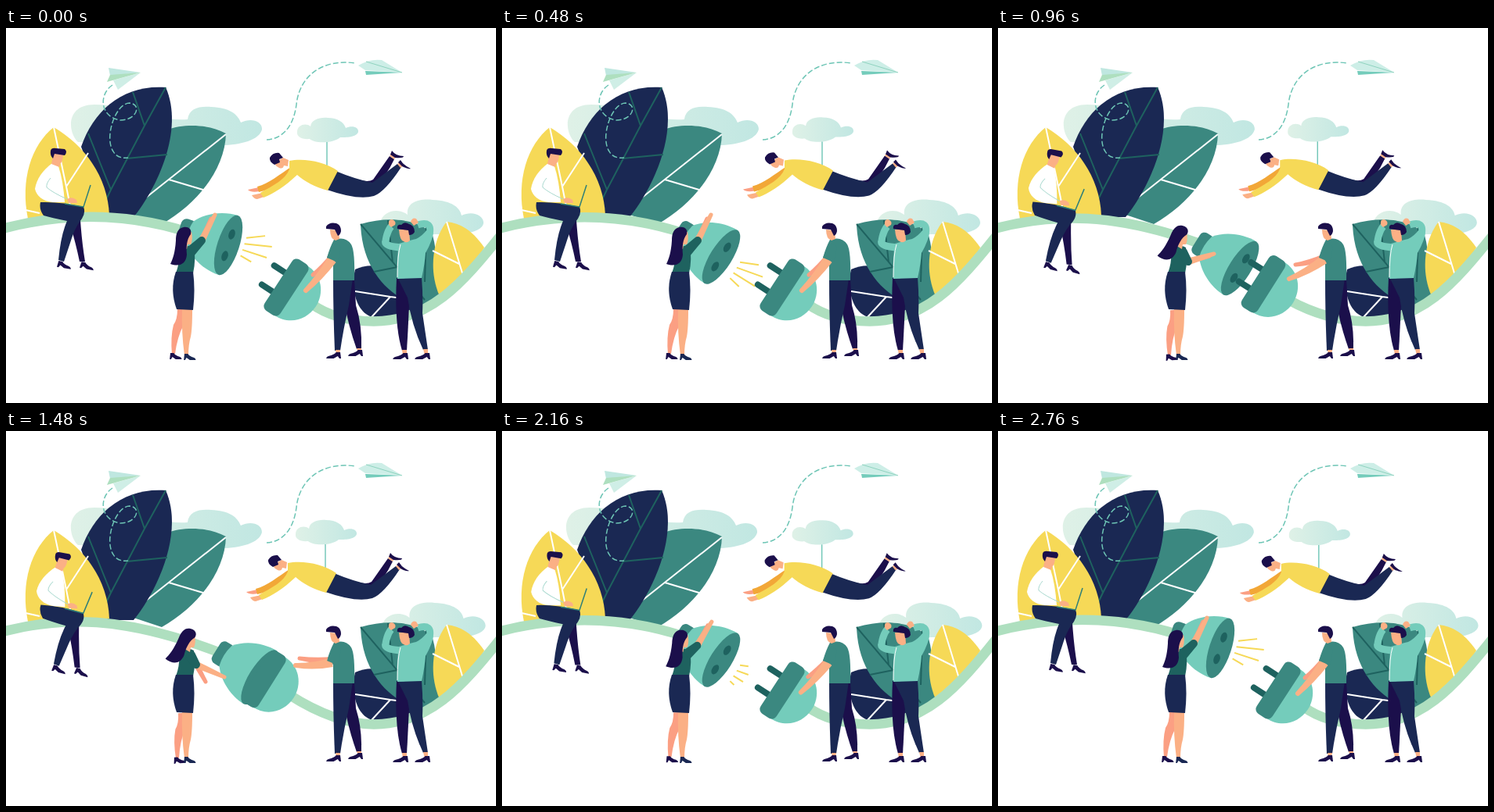
An HTML page for the animation above (2840 ms loop, 626 px wide and 480 px high).

```html
<!DOCTYPE html>
<html lang="en">
<head>
<meta charset="utf-8">
<style>
html,body{margin:0;width:100%;height:100%;overflow:hidden;background:#fff}
svg{display:block;width:100%;height:100%}
.navy{fill:#1a2853}.ink{fill:#1b0f4b}.green{fill:#3b8880}.deep{fill:#1e625f}.mint{fill:#74ccbb}
.yellow{fill:#f6d957}.skin{fill:#fbb085}.pink{fill:#fb9f83}.white{fill:#fff}
.line{fill:none;stroke-width:2}.vw{stroke:#fff}.vd{stroke:#1e625f}
.stem{fill:none;stroke:#aedfbf;stroke-width:12.5}
.dash{fill:none;stroke:#6dc5b5;stroke-width:1.5;stroke-dasharray:7 3}
.sleeve{fill:none;stroke:#74ccbb;stroke-width:9;stroke-linejoin:round}
</style>
</head>
<body>
<svg viewBox="0 0 626 480">
<defs>
  <linearGradient id="sky"><stop stop-color="#dff1e7"/><stop offset="1" stop-color="#c1e7e2"/></linearGradient>
  <path id="shoe" d="M0-8L-1 0H1L3-3L8 0H17Q17-3 11-4Q6-6 5-8Z"/>
</defs>

<g fill="url(#sky)">
  <path id="cloudL" d="M92 146C78 132 77 98 113 98C160 98 190 120 232 117C234 103 246 100 262 101C285 102 296 110 300 121C314 114 328 120 327 130C324 143 300 150 275 150Z"/>
  <path id="cloudR" d="M478 250C480 235 500 229 513 239C511 223 528 218 545 220C570 221 580 230 582 240C596 233 611 240 610 250C608 260 590 264 570 264H490Z"/>
</g>

<path class="green" d="M281 135C257 122 226 123 206 130C195 165 180 200 160 238L199 251C245 225 280 180 281 135Z"/>
<path class="line vw" d="M281 136L160 232M208 194L255 208"/>
<path class="navy" d="M204 76C150 72 112 105 96 152L130 242H163C193 205 228 130 204 76Z"/>
<path class="line vd" d="M204 76L177 125L134 207L119 238M162 82L177 125M105 135L134 207M206 162L154 167"/>
<path class="yellow" d="M28 244C18 195 32 150 61 127C100 150 130 190 132 240Z"/>
<path class="line vw" d="M61 127L77 203L84 238M105 160L77 203M25 233L43 237"/>
<path id="stemL" class="stem"/>

<path class="dash" d="M136 73C118 85 120 114 146 118C167 118 174 98 158 96C140 96 125 140 137 158C141 165 148 167 156 166"/>
<path fill="#bfe7e0" d="M131 51L172 57L133 61Z"/>
<path fill="#cfeee6" d="M137 67L172 57L143 79Z"/>
<path fill="#aedfbf" d="M133 60L172 57L129 69Z"/>
<path class="dash" d="M333 143C352 142 367 128 371 98C375 60 406 39 446 45"/>
<path fill="#cdeee7" d="M450 48Q465 39 480 41L506 57L459 54Z"/>
<path class="mint" d="M459 55L506 57L460 60Z"/>
<path fill="none" stroke="#8fd3bf" d="M460 43L506 57"/>

<g id="sitter">
  <path class="ink" d="M80 246L95 246Q97 275 101 299L94 299Q88 270 80 246Z"/>
  <use href="#shoe" class="ink" transform="translate(95 307)rotate(11)"/>
  <use href="#shoe" class="ink" transform="translate(66 306)rotate(9)"/>
  <path class="navy" d="M44 223Q70 222 99 229Q102 236 97 244Q88 255 82 275L74 299L67 297Q70 265 78 247Q58 243 48 240Q42 232 44 223Z"/>
  <path class="white" d="M59 173C47 182 39 193 37 206C39 215 47 222 60 223H75Q73 195 67 177Z"/>
  <path class="skin" d="M61 160H73Q73 171 69 174L68 178L58 174Z"/>
  <path class="ink" d="M57 157Q58 153 64 154L75 155Q79 158 75 163L62 161L60 167Q56 163 57 157Z"/>
  <path fill="none" stroke="#a9d9cf" d="M57 192Q51 199 52 204Q60 211 78 219"/>
  <path class="skin" d="M78 219Q84 215 90 220L91 224L80 224Z"/>
  <path class="line" stroke="#2f7f78" style="stroke-width:1.5" d="M75 225L99 229L108 201"/>
</g>

<g id="flyer">
  <path fill="url(#sky)" d="M372 133C372 124 383 121 389 126C390 117 401 114 411 115C424 115 432 121 434 128C442 124 451 127 450 133C448 140 434 140 427 140C418 148 394 148 388 142C378 143 371 139 372 133Z"/>
  <path fill="none" stroke="#6dc5b5" stroke-width="1.4" d="M410 146V178"/>
  <path class="pink" d="M323 204L309 207Q313 211 324 209Z"/>
  <path fill="#f2a737" d="M364 178C350 187 336 199 321 203L323 210C342 206 354 196 368 184Z"/>
  <path class="skin" d="M328 211L314 214Q317 219 321 219L330 216Z"/>
  <path class="ink" d="M450 194Q463 198 469 194L490 164L496 168Q485 192 468 205Z"/>
  <path class="skin" d="M490 164L492 161L498 165L496 168Z"/>
  <path class="ink" d="M491 162L493 157Q498 164 508 164Q508 167 497 166Z"/>
  <path class="navy" d="M421 183Q445 193 468 198L500 174L505 178Q484 210 470 215Q450 221 410 207Z"/>
  <path class="skin" d="M500 174L503 172L508 176L504 179Z"/>
  <path class="ink" d="M501 172L504 169Q508 176 517 180Q513 181 506 177Z"/>
  <path class="yellow" d="M362 170C380 166 408 171 424 183L411 208C395 204 381 196 372 188C356 203 342 212 329 217L325 211C342 201 357 194 362 181Z"/>
  <path class="skin" d="M347 170L354 166L361 169L360 177L355 176Q354 181 349 179Q345 177 344 175Z"/>
  <path class="ink" d="M337 166Q341 159 349 160L354 166L349 168L350 172L343 175Q336 171 337 166Z"/>
</g>

<path class="navy" d="M446 309C470 298 500 303 534 352C510 368 490 372 465 369C448 362 440 335 446 309Z"/>
<path class="line vw" d="M446 337L491 344L530 349M491 344L467 370"/>
<path class="green" d="M453 251C490 240 530 245 545 265C552 290 550 320 554 342L530 357C490 345 455 310 453 251Z"/>
<path class="line vd" d="M453 251L535 348M488 246L494 300M500 306L470 312M537 254L535 325"/>
<path class="yellow" d="M563 248C585 250 600 265 611 281C595 310 575 328 553 341C540 310 545 270 563 248Z"/>
<path class="line vw" d="M563 248L584 317M545 285L579 302"/>
<path id="stemR" class="stem"/>

<path class="ink" d="M499 320H516Q515 365 512 413H506Q496 380 499 320Z"/>
<path class="navy" d="M500 319H531Q533 345 532 365L539 412H533Q518 380 513 345Z"/>
<path class="skin" d="M506 412H512V419H507ZM533 411H539V419H535Z"/>
<use href="#shoe" class="ink" transform="translate(513 424)scale(-1.1 1)"/>
<use href="#shoe" class="ink" transform="translate(541 424)scale(-1.1 1)"/>
<path class="sleeve" d="M507 281Q482 280 485 272Q487 260 492 254"/>
<path class="sleeve" d="M541 264Q545 246 526 252"/>
<path class="mint" d="M502 276Q516 272 524 270Q532 266 537 259L546 260Q546 270 536 288Q535 302 531 320L500 321Q499 295 502 276Z"/>
<path class="line vw" style="stroke-width:1" d="M504 277Q500 290 500 319"/>
<path class="skin" d="M489 252Q488 245 493 245Q499 247 497 252L492 255ZM517 248Q519 242 524 244L527 249L521 253Z"/>
<path class="skin" d="M502 258H515L516 272Q512 276 508 273Q503 272 502 258Z"/>
<path class="ink" d="M500 257Q499 251 505 252Q509 247 515 251Q522 253 522 261Q520 265 515 265L514 259Z"/>

<g id="socket">
  <rect class="green" x="-66" y="-16" width="20" height="32" rx="7"/>
  <path class="mint" d="M0-40C-18-40-40-31-52-15Q-56 0-52 15C-40 31-18 40 0 40Z"/>
  <ellipse class="green" rx="14" ry="40"/>
  <ellipse class="deep" cy="-14.5" rx="4" ry="6.7"/>
  <ellipse class="deep" cy="14.5" rx="4" ry="6.7"/>
</g>
<path id="rays" class="line" stroke="#f6d957"/>
<g id="plug">
  <path id="pins" fill="none" stroke="#1e625f" stroke-width="8" stroke-linecap="round"/>
  <path class="mint" d="M6-38C30-39 45-20 45 0S30 39 6 38Z"/>
  <rect class="green" x="-12" y="-39" width="24" height="78" rx="7"/>
</g>

<path class="ink" d="M430 322H445L447 355Q455 380 454 411H448Q437 380 432 350Z"/>
<path class="navy" d="M418 321H443L438 355Q431 385 427 413H420Q418 365 418 321Z"/>
<path class="skin" d="M421 412H427L426 418H422ZM448 410H454V416H450Z"/>
<use href="#shoe" class="ink" transform="translate(427 423)scale(-1.05 1)"/>
<use href="#shoe" class="ink" transform="translate(455 420)scale(-1.05 1)"/>
<path class="pink" id="manRear"/>
<path class="green" d="M419 271Q434 266 441 277Q446 285 445 323H418V299L410 294Q414 280 419 271Z"/>
<path class="skin" id="manFront"/>
<path class="green" d="M419 274L428 280L424 300L410 294Z"/>
<path class="skin" d="M414 258L425 259L426 270L421 272Q414 270 414 258Z"/>
<path class="ink" d="M409 254Q413 248 422 250Q428 252 428 260Q427 265 424 266L420 258L409 257Z"/>

<g id="legRear">
  <path class="pink" d="M219 360H228Q226 376 226 382Q219 395 216 417L212 418Q210 395 214 380Q219 373 219 360Z"/>
  <use href="#shoe" class="ink" transform="translate(210 424)scale(.85 1)"/>
</g>
<path class="skin" d="M225 360H238Q238 385 236 395Q233 405 233 419H228Q224 390 225 360Z"/>
<use href="#shoe" class="navy" transform="translate(228 425)scale(.85 1)"/>
<path class="pink" id="armRear"/>
<path class="deep" d="M223 284Q232 276 240 281Q243 295 239 314H217Q222 300 221 290Z"/>
<path class="navy" d="M217 312H239Q242 335 239 361L218 360Q209 335 217 312Z"/>
<path class="skin" id="armFront"/>
<path class="deep" id="armSleeve"/>
<path class="skin" id="face" d="M229 261H237Q239 271 236 277L232 277L231 283L226 280Z"/>
<path class="ink" id="hair" d="M227 255C219 256 217 264 217 272C216 288 213 296 210 302C222 306 230 302 231 290C230 280 231 270 236 264C238 257 232 254 227 255Z"/>
</svg>
<script>
const LOOP = 2840;

const $ = id => document.getElementById(id);
const draw = (id, d) => $(id).setAttribute('d', d);
const move = (id, transform) => $(id).setAttribute('transform', transform);
const mix = (a, b, p) => a.map((v, i) => v + (b[i] - v) * p);

function ease(t, from, to) {
  const p = Math.min(1, Math.max(0, (t - from) / (to - from)));
  return p * p * (3 - 2 * p);
}

// Rises from 0 to 1 between a and b, falls back between c and d.
const swing = (t, a, b, c, d) => ease(t, a, b) - ease(t, c, d);

// A limb from one point to another that narrows from width w to v and sags a little.
function limb([x, y], [u, z], w, v, sag = 0) {
  const len = Math.hypot(u - x, z - y), nx = (y - z) / len / 2, ny = (u - x) / len / 2, r = v / 2;
  const mx = (x + u) / 2, my = (y + z) / 2 + sag, m = (w + v) / 2;
  return `M${x + nx * w} ${y + ny * w}Q${mx + nx * m} ${my + ny * m} ${u + nx * v} ${z + ny * v}` +
    `A${r} ${r} 0 0 0 ${u - nx * v} ${z - ny * v}Q${mx - nx * m} ${my - ny * m} ${x - nx * w} ${y - ny * w}Z`;
}

// Point at the given distance along the axis of a rotated part.
function along([x, y], angle, dist) {
  const a = angle * Math.PI / 180;
  return `${x + dist * Math.cos(a)} ${y + dist * Math.sin(a)}`;
}

function rays(size) {
  let d = '';
  for (let i = 0; i < 4 && size > 0; i++) {
    const start = [19, -16 + 8 * i];
    d += `M${start}L${along(start, 12 * i - 24, size * (36 - 7 * (i - 1.3) ** 2))}`;
  }
  return d;
}

function frame() {
  const t = performance.now() % LOOP, turn = t / LOOP * Math.PI;
  const tilt = swing(t, 120, 480, 2160, 2600);
  const pose = swing(t, 560, 900, 1840, 2240);
  const meet = swing(t, 560, 1240, 1400, 2160);
  const push = swing(t, 560, 1240, 1400, 2000);
  const release = swing(t, 1000, 1240, 1480, 1760);
  const glow = 1 - swing(t, 520, 720, 2040, 2300);

  // Drifting sky and the man hanging in it
  move('cloudL', `translate(${Math.sin(2 * turn)} 0)`);
  move('cloudR', `translate(${3.5 * Math.sin(turn / 2)} 0)`);
  move('flyer', `translate(${-2 * Math.sin(turn)} ${-Math.sin(turn)})`);
  move('sitter', `rotate(${5 * pose} 50 228)`);

  // Socket, plug and the stems that serve as their cable
  const socket = mix(mix([284, 278], [280, 293], tilt), [326, 316], meet);
  const plug = [358 - 30 * push, 332 - 17 * push ** 3];
  const socketAngle = 18 + 14 * tilt, plugAngle = 33 - push;
  move('socket', `translate(${socket})rotate(${socketAngle})`);
  move('plug', `translate(${plug})rotate(${plugAngle})`);
  const pin = -Math.max(4, Math.min(28, Math.hypot(plug[0] - socket[0], plug[1] - socket[1])));
  draw('pins', `M${pin} -15H-4M${pin} 14H-4`);
  draw('stemL', `M-5 257C70 237 150 236 ${along(socket, socketAngle, -58)}`);
  draw('stemR', `M${along(plug, plugAngle, 38)}Q420 375 470 375.5C540 375 580 331 634 263`);
  move('rays', `translate(${socket})rotate(${socketAngle})translate(${5 * tilt} ${9 * tilt})`);
  draw('rays', rays(glow));

  // Arms: holding, carrying, then letting go
  const reach = (hold, carry, open) => mix(mix(hold, carry, pose), open, release);
  const elbow = mix([250, 272], [243, 299], pose);
  draw('manRear', limb([417, 294], reach([392, 316], [380, 303], [375, 291]), 10, 5, 2));
  draw('manFront', limb([417, 296], reach([383, 336], [372, 321], [370, 300]), 12, 6, 4));
  draw('armRear', limb(elbow, reach([262, 244], [270, 292], [255, 321]), 7, 5));
  draw('armFront', limb(elbow, reach([267, 239], [276, 289], [279, 315]), 9, 5));
  draw('armSleeve', limb([235, 287], elbow, 14, 10));

  move('hair', `translate(${6 * pose} ${-pose})rotate(${20 * pose} 231 262)`);
  move('face', `translate(${4 * pose} 0)`);
  move('legRear', `translate(${pose} ${pose})rotate(${-4 * pose} 224 360)`);
  requestAnimationFrame(frame);
}
frame();
</script>
</body>
</html>
```
